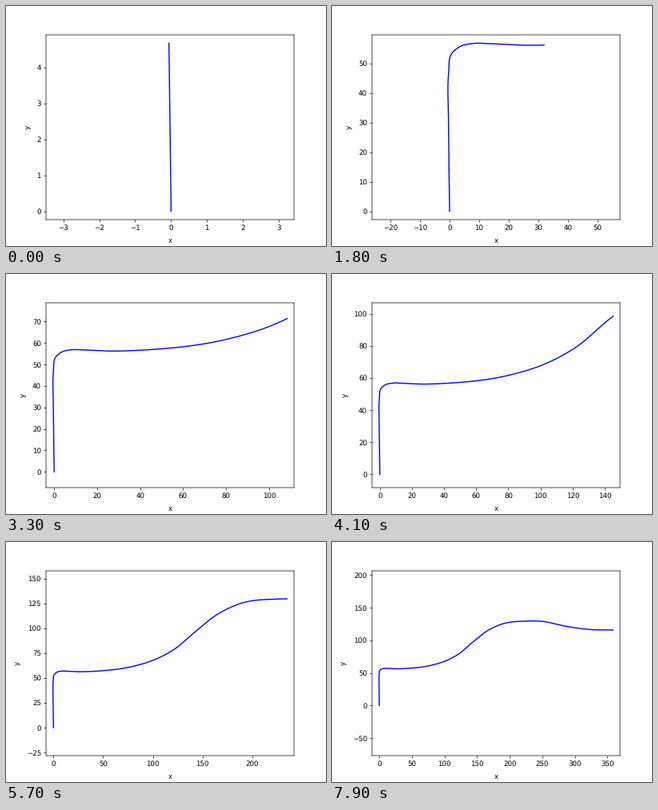
Recreate the animation shown at these times as a matplotlib script. Size 400 by 300 pixels, loop 8 s.

```python
import numpy as np
import matplotlib.pyplot as plt
from matplotlib.animation import FuncAnimation

FRAMES, INTERVAL = 80, 100
WIDTH, HEIGHT, DPI = 6.4, 4.8, 62.5
PAPER = "#fefdff"
START = 4.68                # distance already covered when the loop begins
Y_PAD, X_PAD = 1.10, 1.059  # view size relative to the path size

# bends of the route: north, a right turn, then a long S to the east
BENDS = np.array([
    (0, 0), (-.35, 30), (-.3, 47), (.6, 53.2), (3.6, 55.8), (7.5, 56.75),
    (14, 56.7), (25, 56.2), (42, 56.7), (80, 61.6), (100.5, 67.8),
    (121, 78.4), (142, 95.9), (167, 115.2), (190, 125.4), (225, 129.3),
    (251, 128.8), (282, 122.2), (322, 116.5), (358.6, 115.7),
])


def spline(t, knots, values):
    """Cubic Hermite curve through values at knots."""
    slopes = np.gradient(values, knots)
    i = np.clip(np.searchsorted(knots, t, side="right") - 1, 0, len(knots) - 2)
    h = knots[i + 1] - knots[i]
    u = (t - knots[i]) / h
    return ((2 * u**3 - 3 * u**2 + 1) * values[i]
            + (u**3 - 2 * u**2 + u) * h * slopes[i]
            + (3 * u**2 - 2 * u**3) * values[i + 1]
            + (u**3 - u**2) * h * slopes[i + 1])


def arc_length(x, y):
    return np.r_[0, np.cumsum(np.hypot(np.diff(x), np.diff(y)))]


bx, by = BENDS.T
chord = arc_length(bx, by)
t = np.linspace(0, chord[-1], 900)
px, py = spline(t, chord, bx), spline(t, chord, by)
dist = arc_length(px, py)

# smooth speed through the x reached at a few steps
key_step = np.array([0, 18, 33, 48, 57, 66, 79])
key_x = [32, 108.4, 180, 235, 286.8, 358.6]
east = px > 20
key_dist = np.r_[START, np.interp(key_x, px[east], dist[east])]
travelled = spline(np.arange(FRAMES), key_step, key_dist)

plt.rcParams.update({"text.hinting": "none", "axes.labelpad": 8,
                     "figure.facecolor": PAPER, "axes.facecolor": PAPER})
fig, ax = plt.subplots(figsize=(WIDTH, HEIGHT), dpi=DPI)
line, = ax.plot([], [], color="blue", lw=1.6)
ax.set_xlabel("x")
ax.set_ylabel("y")
for spine in ax.spines.values():
    spine.set_snap(False)
box = ax.get_position()
ratio = (box.width * WIDTH) / (box.height * HEIGHT)


def update(step):
    s = travelled[step]
    n = np.searchsorted(dist, s)
    x = np.r_[px[:n], np.interp(s, dist, px)]
    y = np.r_[py[:n], np.interp(s, dist, py)]
    line.set_data(x, y)
    # equal scale on both axes, filled by the tighter direction
    half = max(Y_PAD * np.ptp(y), X_PAD * np.ptp(x) / ratio) / 2
    cx, cy = (x.min() + x.max()) / 2, (y.min() + y.max()) / 2
    ax.set_xlim(cx - half * ratio, cx + half * ratio)
    ax.set_ylim(cy - half, cy + half)
    return line,


anim = FuncAnimation(fig, update, frames=FRAMES, interval=INTERVAL,
                     repeat=True, repeat_delay=0, blit=False)
plt.show()
```
